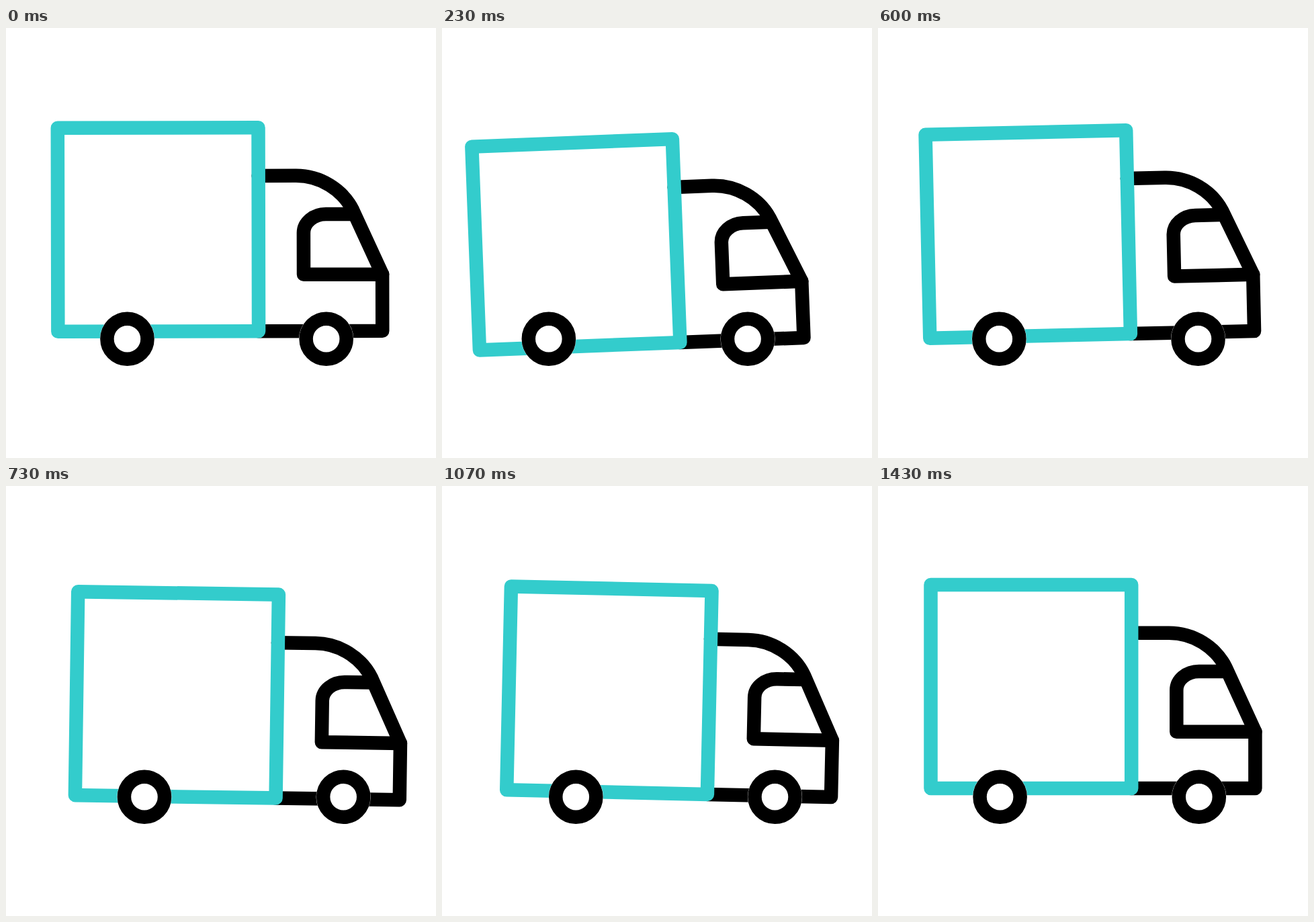
Animation of 640 by 640 pixels, one loop 1.67 s. Source, as an HTML page:

```html
<!DOCTYPE html>
<html lang="en">
<head>
<meta charset="utf-8">
<title>Delivery truck</title>
<style>
  html, body { margin: 0; width: 100%; height: 100%; overflow: hidden; background: #fff; }
  svg { display: block; width: 100vw; height: 100vh; }
  .line { fill: none; stroke: #000; stroke-width: 20.5; stroke-linecap: round; stroke-linejoin: round; }
  .cargo { stroke: #33cccc; }
  .gap { fill: #fff; }
</style>
</head>
<body>
<svg viewBox="0 0 640 640">
  <g id="body">
    <path class="line" d="M377.2 218.8H433C469.5 218.8 502.5 239.7 517.5 270L561.4 365.8V450H377.2"/>
    <path class="line" d="M517.5 276H477.5A33.2 28 0 0 0 444.3 304V365.8H561.4"/>
    <rect class="line cargo" x="78.5" y="147" width="298.7" height="303"/>
  </g>
  <g id="wheels">
    <circle class="gap" cx="181.6" cy="462.8" r="40.6"/>
    <circle class="line" cx="181.6" cy="462.8" r="30.05"/>
    <circle class="gap" cx="477.8" cy="462.8" r="40.6"/>
    <circle class="line" cx="477.8" cy="462.8" r="30.05"/>
  </g>
</svg>
<script>
  const LOOP = 1670, FPS = 30, LAST = 43;
  const body = document.getElementById('body');
  const wheels = document.getElementById('wheels');

  // Keys: [time in ms, value, optional easing skew]
  const shift = [[-50, 0], [395, -32.5], [800, 28.8], [1430, 0]];
  const tilt = [[-50, 0], [430, -3.45], [870, 1.76, 0.85], [1430, 0]];
  const drop = [[-50, 0], [290, 21.8], [500, 3.5], [870, 17.8, 0.95], [1230, 0]];

  function sample(keys, t) {
    const n = keys.findIndex(key => key[0] > t);
    if (n < 0) return keys[keys.length - 1][1];
    const [t0, a] = keys[n - 1];
    const [t1, b, skew = 1] = keys[n];
    const u = ((t - t0) / (t1 - t0)) ** skew;
    return a + (b - a) * u * u * (3 - 2 * u);
  }

  function draw(ms) {
    // The motion advances in 30 fps steps, then rests.
    const step = Math.min(LAST, Math.floor((ms % LOOP + 3.4) * FPS / 1000));
    const t = step * 1000 / FPS;
    const x = sample(shift, t);
    wheels.setAttribute('transform', `translate(${x} 0)`);
    body.setAttribute('transform',
      `translate(${x} ${sample(drop, t)}) rotate(${sample(tilt, t)} 320 450)`);
  }

  const start = performance.now();
  function tick() {
    draw(performance.now() - start);
    requestAnimationFrame(tick);
  }
  tick();
</script>
</body>
</html>
```
